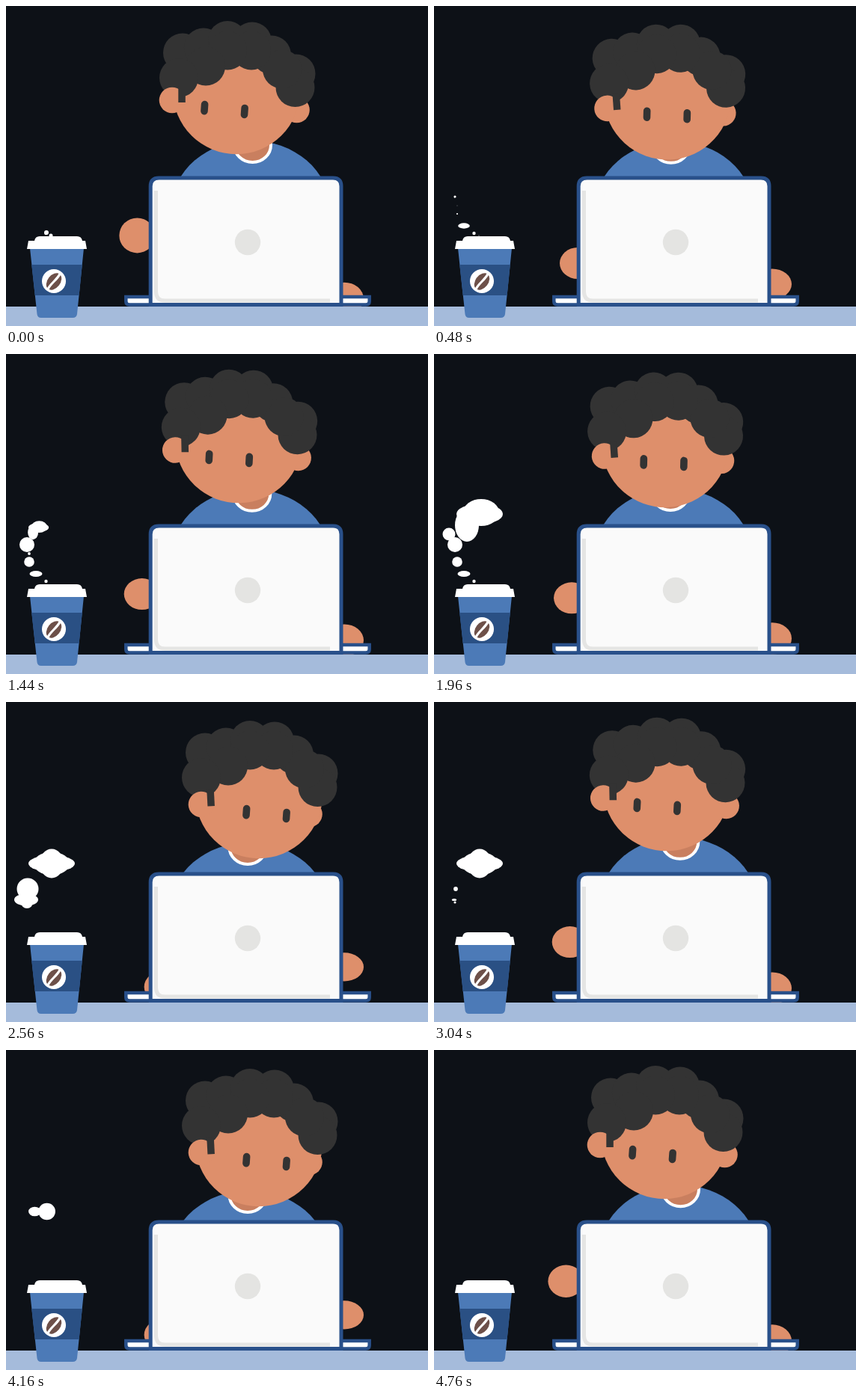
An HTML page that plays this animation: 564x428 px, repeating every 4800 ms.

```html
<!DOCTYPE html>
<html lang="en">
<head>
<meta charset="utf-8">
<title>Working at a laptop</title>
<style>
  html, body { margin: 0; width: 100%; height: 100%; overflow: hidden; background: #0d1117; }
  svg { display: block; width: 100vw; height: 100vh; }
</style>
</head>
<body>
<svg viewBox="0 0 564 428" xmlns="http://www.w3.org/2000/svg">
  <rect width="564" height="428" fill="#0d1117"/>

  <g id="body">
    <ellipse rx="105.500" ry="90" fill="#4c7ab7"/>
    <ellipse id="collar" cy="-84" rx="24.500" ry="23" fill="#c97f5f" stroke="#fff" stroke-width="4"/>
  </g>

  <g id="head" fill="#de8f6b">
    <circle id="earR" r="17.300"/>
    <circle cy="-1.800" r="85"/>
    <g id="hair" fill="#333"></g>
    <g id="earL">
      <circle r="17.300"/>
      <rect x="8.300" y="-19" width="9.500" height="22" fill="#333"/>
    </g>
    <g id="eyes" fill="#333">
      <rect x="-31.500" y="11.800" width="9.600" height="18.600" rx="4.800" transform="rotate(4 -27 21)"/>
      <rect x="22" y="16.700" width="9.600" height="18.600" rx="4.800" transform="rotate(4 27 26)"/>
    </g>
  </g>

  <g fill="#de8f6b">
    <ellipse id="handL"/>
    <ellipse id="handR"/>
  </g>
  <rect y="402" width="564" height="26" fill="#a5bbdb"/>

  <g stroke="#29508a">
    <path d="M160.300 389H485.700V395Q485.700 399.500 481 399.500H165Q160.300 399.500 160.300 395Z" fill="#fff" stroke-width="4.500"/>
    <path d="M193.200 399.500V241Q193.200 230 204.500 230H437Q448 230 448 241V399.500Z" fill="#fafafa" stroke-width="5"/>
  </g>
  <path d="M200.500 247V382Q200.500 394 212 394H433" fill="none" stroke="#e5e5e4" stroke-width="5"/>
  <circle cx="323" cy="316" r="17.200" fill="#e4e4e2"/>

  <path d="M32 324H104L95 412Q94.500 417 89 417H47Q42 417 41.500 412Z" fill="#4c7ab7"/>
  <path d="M34.200 346H101.800L97.700 387H38.700Z" fill="#2a5084"/>
  <path d="M28 325L30 314H38Q39 308 45 308H95Q101 308 102 314H106L108 325Z" fill="#fff"/>
  <circle cx="64" cy="368" r="16" fill="#fff"/>
  <g transform="translate(64 368.500) rotate(38)">
    <ellipse rx="8.500" ry="12.500" fill="#6d5049"/>
    <path d="M0 -13C2 -5 -2 5 0 13" fill="none" stroke="#fff" stroke-width="3.200"/>
  </g>

  <g id="steam" fill="#fff"></g>
</svg>
<script>
const LOOP = 4800, SWAY = 1600, STEP = 40;
const $ = id => document.getElementById(id);
const clamp = v => Math.max(0, Math.min(1, v));
const smooth = v => v * v * (3 - 2 * v);
const ramp = (t, from, to) => clamp((t - from) / (to - from));
const lerp = (a, b, k) => a + (b - a) * k;
const bump = (p, peak, width) => Math.cos(clamp(Math.abs(p - peak) / width) * Math.PI / 2) ** 2;

function add(parent, tag, attrs = {}) {
  const el = document.createElementNS('http://www.w3.org/2000/svg', tag);
  for (const k in attrs) el.setAttribute(k, attrs[k]);
  return parent.appendChild(el);
}

function place(id, x, y, turn = 0) {
  $(id).setAttribute('transform', `translate(${x} ${y}) rotate(${turn})`);
}

function oval(el, cx, cy, rx, ry) {
  Object.entries({ cx, cy, rx, ry }).forEach(([k, v]) => el.setAttribute(k, v));
}

// Equal curls around a filled core
const curls = [
  [-72, -17], [-44, -24], [-12, -33.5], [21, -32], [47, -14], [79.500, 11],
  [78.500, 29.500], [61, 5], [20, -20], [-12, -20], [-41, 1], [-77, 16.500]
];
add($('hair'), 'path', { d: 'M' + curls.join('L') + 'Z' });
for (const [cx, cy] of curls) add($('hair'), 'circle', { cx, cy, r: 26 });

// yaw: -1 looks left, 1 looks right
const left = { yaw: -1, x: 308, y: 115, bodyX: 327, bodyY: 270, collar: 2.5 };
const rest = { yaw: 0, x: 309, y: 122, bodyX: 320, bodyY: 270, collar: -4 };
const right = { yaw: 1, x: 338, y: 126, bodyX: 325, bodyY: 278, collar: -2 };

function blend(a, b, k) {
  const out = {};
  for (const key in a) out[key] = lerp(a[key], b[key], k);
  return out;
}

function pose(p) {
  if (p < 360) return blend(left, rest, 1 - (1 - p / 360) ** 3);
  if (p < 960) return blend(rest, right, smooth((p - 360) / 600));
  return blend(right, left, smooth(ramp(p, 960, 1560)));
}

function drawPerson(p) {
  const { yaw, x, y, bodyX, bodyY, collar } = pose(p);
  const lift = 12 * bump(p, 800, 160) - ramp(p, 1520, 1560) * (SWAY - p) / STEP;
  place('body', bodyX, bodyY - lift * 0.3);
  $('collar').setAttribute('cx', collar);
  place('head', x, y - lift, -2.5 * (1 - yaw * yaw));
  place('hair', 0, -38.5 - 3 * yaw);
  place('earL', 4.5 * yaw - 81.5, 11, -1.5 * (1 + yaw));
  place('earR', 74 - 6.5 * yaw, 24);
  place('eyes', 13 * yaw - 3, 0);

  // The hands tap in turn
  const swing = Math.cos((p - 80) / SWAY * 2 * Math.PI);
  const tap = bump((p + SWAY / 2) % SWAY, 880, 160);
  oval($('handL'), 192 - 17.5 * swing, 344 - 39 * swing, 24, 21 + 5 * tap);
  oval($('handR'), 452, 372 + 18.5 * swing + 4 * tap, 26, 20.5 + 1.5 * swing);
}

// Puffs that swell from `start` and shrink from `fade`; each is x, y, rx, ry
const bursts = [
  { start: -500, fade: 0, puffs: [[54, 303, 3], [60, 307, 2.5]] },
  { start: -500, fade: 1960, puffs: [[53.5, 304, 2.2]] },
  { start: 20, fade: 1960, puffs: [[40, 294, 8.5, 4]] },
  { start: 400, fade: 1960, puffs: [[31, 278, 6.8], [28, 255, 10]] },
  { start: 460, fade: 960, puffs: [[27.5, 256, 13.5], [31, 267, 9.5]] },
  { start: 1460, fade: 1960, puffs: [[20, 241, 8.5]] },
  { start: 2060, fade: 2560, puffs: [[29, 250, 14.5], [27, 264.5, 16, 8], [28, 268, 8]] }
];
for (const b of bursts) b.els = b.puffs.map(() => add($('steam'), 'ellipse'));

// Cloud lobes meet at one centre, then thin out to the left
const lobes = [
  { dx: -17, dy: 13, rx: 16, ry: 19.5, drift: 9, thin: 0.5 },
  { dx: 0, dy: -2, rx: 31, ry: 11, drift: 32, thin: 1.9 },
  { dx: 2, dy: -4, rx: 24, ry: 15.5, drift: 18, thin: 4 }
];
for (const l of lobes) l.el = add($('steam'), 'ellipse');

function drawSteam(t) {
  for (const { start, fade, puffs, els } of bursts) {
    const s = Math.min(ramp(t, start, start + 500), 1 - ramp(t, fade, fade + 600));
    puffs.forEach(([x, y, rx, ry = rx], i) => oval(els[i], x, y, rx * s, ry * s));
  }
  const grow = smooth(ramp(t, 1000, 1960));
  const loose = 1 - smooth(ramp(t, 1960, 2560));
  const gone = ramp(t, 3560, 4760);
  for (const { el, dx, dy, rx, ry, drift, thin } of lobes) {
    const x = lerp(30, 61 + dx * loose, grow) - drift * Math.sin(gone * Math.PI / 2);
    const y = lerp(246, 216 + dy * loose, grow);
    oval(el, x, y, rx * grow * (1 - gone) ** thin, (ry + 2.5 * loose) * grow * (1 - gone) ** 0.8);
  }
}

function draw(ms) {
  const t = Math.floor(ms / STEP) * STEP % LOOP;
  drawPerson(t % SWAY);
  drawSteam(t);
}

const begin = performance.now();
function tick() {
  draw(performance.now() - begin);
  requestAnimationFrame(tick);
}
tick();
</script>
</body>
</html>
```
